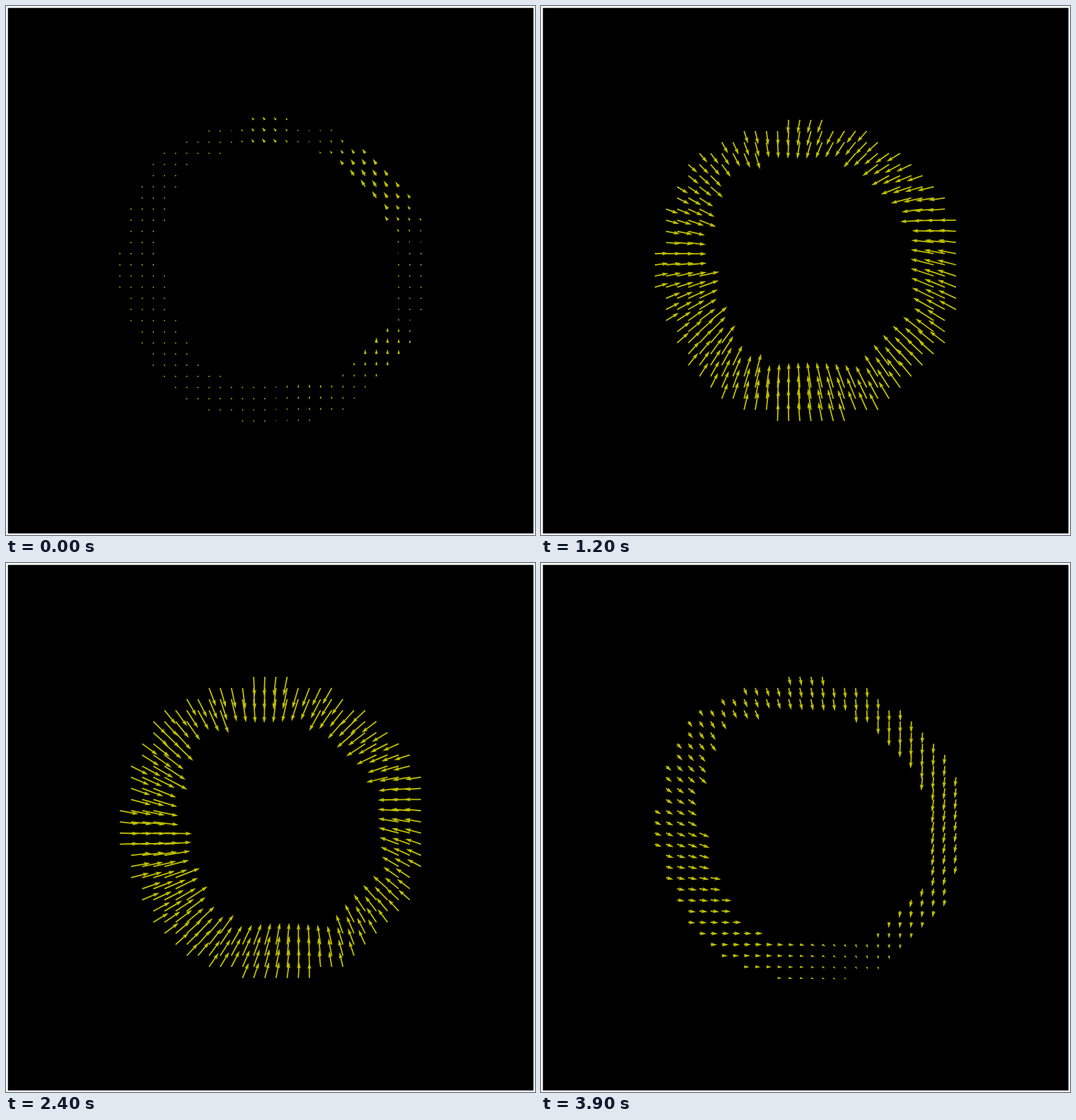
Write an HTML page with a canvas that moves like this. It is 748x748 px and loops after 4 s.

```html
<!DOCTYPE html>
<html lang="en">
<head>
<meta charset="utf-8">
<title>Ring motion field</title>
<style>
  html, body { margin: 0; width: 100%; height: 100%; overflow: hidden; background: #fff; }
  canvas { display: block; width: 748px; height: 748px; }
</style>
</head>
<body>
<canvas id="stage" width="748" height="748"></canvas>
<script>
const ctx = document.getElementById('stage').getContext('2d');
const LOOP = 4000, STEP = 100;
const CELLS = 28, ORIGIN = 161, PITCH = 15.77, CENTER = 374, MID_RADIUS = 192;
const SHAFT = 1.78;

// Angles are in degrees, clockwise from the right.
const RAD = Math.PI / 180;
const angleOf = (x, y) => (Math.atan2(y, x) / RAD + 360) % 360;

function bump(angle, at, spread) {
  const d = ((angle - at + 540) % 360) - 180;
  return Math.exp(-d * d / (2 * spread * spread));
}

// Wall outlines in grid cells: round shapes with a few bulges and dents.
function outerRadius(a) {
  return 13.86 + 0.31 * Math.cos((a - 25) * RAD) + 0.62 * bump(a, 225, 16) +
         0.2 * bump(a, 340, 12) - 0.19 * bump(a, 297, 20);
}

function holeRadius(a) {
  return Math.sqrt(111 + 16.8 * bump(a, 45, 32) + 21 * bump(a, 228, 12) -
                   14 * bump(a, 165, 12) + 7 * bump(a, 120, 10));
}

function inWall(col, row) {
  const x = col - 13.5, y = row - 13.5, hx = col - 14, hy = row - 13;
  return Math.hypot(x, y) <= outerRadius(angleOf(x, y)) &&
         Math.hypot(hx, hy) > holeRadius(angleOf(hx, hy));
}

const points = [];
for (let row = 0; row < CELLS; row++) {
  for (let col = 0; col < CELLS; col++) {
    if (!inWall(col, row)) continue;
    const x = ORIGIN + col * PITCH, y = ORIGIN + row * PITCH;
    const dx = x - CENTER, dy = y - CENTER;
    points.push({
      x, y,
      angle: angleOf(dx, dy),
      gain: 1 + (MID_RADIUS - Math.hypot(dx, dy)) / 160
    });
  }
}

// Whole-ring motion: drift, contraction, rotation and shear, in pixels.
const KEYS = [
  { t: 900,  x: -3.5, y: -7.8, squeeze: 20.9, twist: 0.6,  shear: -1.9 },
  { t: 1500, x: -4.5, y: -3.3, squeeze: 30.9, twist: 3,    shear: -0.4 },
  { t: 2000, x: -2.9, y: -3.3, squeeze: 30.3, twist: 6.2,  shear: -0.7 },
  { t: 2400, x: 1.8,  y: 0.5,  squeeze: 28.9, twist: 4.1,  shear: 0.1 },
  { t: 3200, x: 2.5,  y: 5.4,  squeeze: 10.2, twist: -1.2, shear: 3.2 },
  { t: 3900, x: 4.2,  y: 9.4,  squeeze: 6.9,  twist: -2.1, shear: 3.3 }
];
const ONSET = KEYS[0].t;

function hermite(a, b, ma, mb, u) {
  const u2 = u * u, u3 = u2 * u;
  return (2 * u3 - 3 * u2 + 1) * a + (u3 - 2 * u2 + u) * ma +
         (3 * u2 - 2 * u3) * b + (u3 - u2) * mb;
}

function poseAt(t) {
  const last = KEYS.length - 1, time = Math.max(t, ONSET);
  let k = 0;
  while (k < last - 1 && time >= KEYS[k + 1].t) k++;
  const span = KEYS[k + 1].t - KEYS[k].t;
  const pose = {};
  for (const name of ['x', 'y', 'squeeze', 'twist', 'shear']) {
    const slope = n => {
      const a = KEYS[Math.max(n - 1, 0)], b = KEYS[Math.min(n + 1, last)];
      return (b[name] - a[name]) / (b.t - a.t) * span;
    };
    pose[name] = hermite(KEYS[k][name], KEYS[k + 1][name],
                         slope(k), slope(k + 1), (time - KEYS[k].t) / span);
  }
  return pose;
}

function ringMotion(pose, angle) {
  const a = angle * RAD, c = Math.cos(a), s = Math.sin(a);
  const bend = 0.55 * pose.twist;
  return [
    pose.x - pose.squeeze * c + (pose.shear + pose.twist) * s + bend * Math.sin(2 * a),
    pose.y - pose.squeeze * s + (pose.shear - pose.twist) * c - bend * Math.cos(2 * a)
  ];
}

// Local twitches before the contraction; the top also lifts briefly.
function restMotion(angle, p) {
  const right = bump(angle, 320, 17), top = bump(angle, 268, 9), low = bump(angle, 34, 10);
  const fade = 1 - Math.pow(p, 1.6);
  return [
    fade * (-6 * right - 4 * top),
    fade * (-9.5 * right - 5 * top - 7 * low - 4 * bump(angle, 70, 16)) -
      10 * Math.sin(Math.PI * p) * bump(angle, 268, 22)
  ];
}

function motionAt(t, pose, angle) {
  const ring = ringMotion(pose, angle);
  if (t >= ONSET) return ring;
  const p = t / ONSET, rest = restMotion(angle, p);
  return ring.map((v, i) => v * Math.pow(p, 1.6) + rest[i]);
}

function arrow(x, y, dx, dy) {
  const len = Math.hypot(dx, dy);
  ctx.beginPath();
  if (len < SHAFT) {
    ctx.arc(x, y, SHAFT / 2, 0, 2 * Math.PI);
    ctx.fill();
    return;
  }
  const c = dx / len, s = dy / len;
  const w = SHAFT * Math.min(1, len / (5 * SHAFT));
  const to = (a, b) => ctx.lineTo(x + a * c - b * s, y + a * s + b * c);
  const neck = len - 4.5 * w, barb = len - 5 * w;
  to(0, -w / 2);
  to(neck, -w / 2);
  to(barb, -1.5 * w);
  to(len, 0);
  to(barb, 1.5 * w);
  to(neck, w / 2);
  to(0, w / 2);
  ctx.fill();
}

function draw(t) {
  ctx.fillStyle = '#fff';
  ctx.fillRect(0, 0, 748, 748);
  ctx.fillStyle = '#000';
  ctx.fillRect(2.7, 2.7, 743.1, 743.1);
  ctx.fillStyle = '#bfbf00';
  const pose = poseAt(t);
  for (const p of points) {
    const [dx, dy] = motionAt(t, pose, p.angle);
    arrow(p.x, p.y, dx * p.gain, dy * p.gain);
  }
}

const start = performance.now();
let shown = -1;
function tick() {
  const t = Math.floor(((performance.now() - start) % LOOP) / STEP) * STEP;
  if (t !== shown) draw(shown = t);
  requestAnimationFrame(tick);
}
tick();
</script>
</body>
</html>
```
